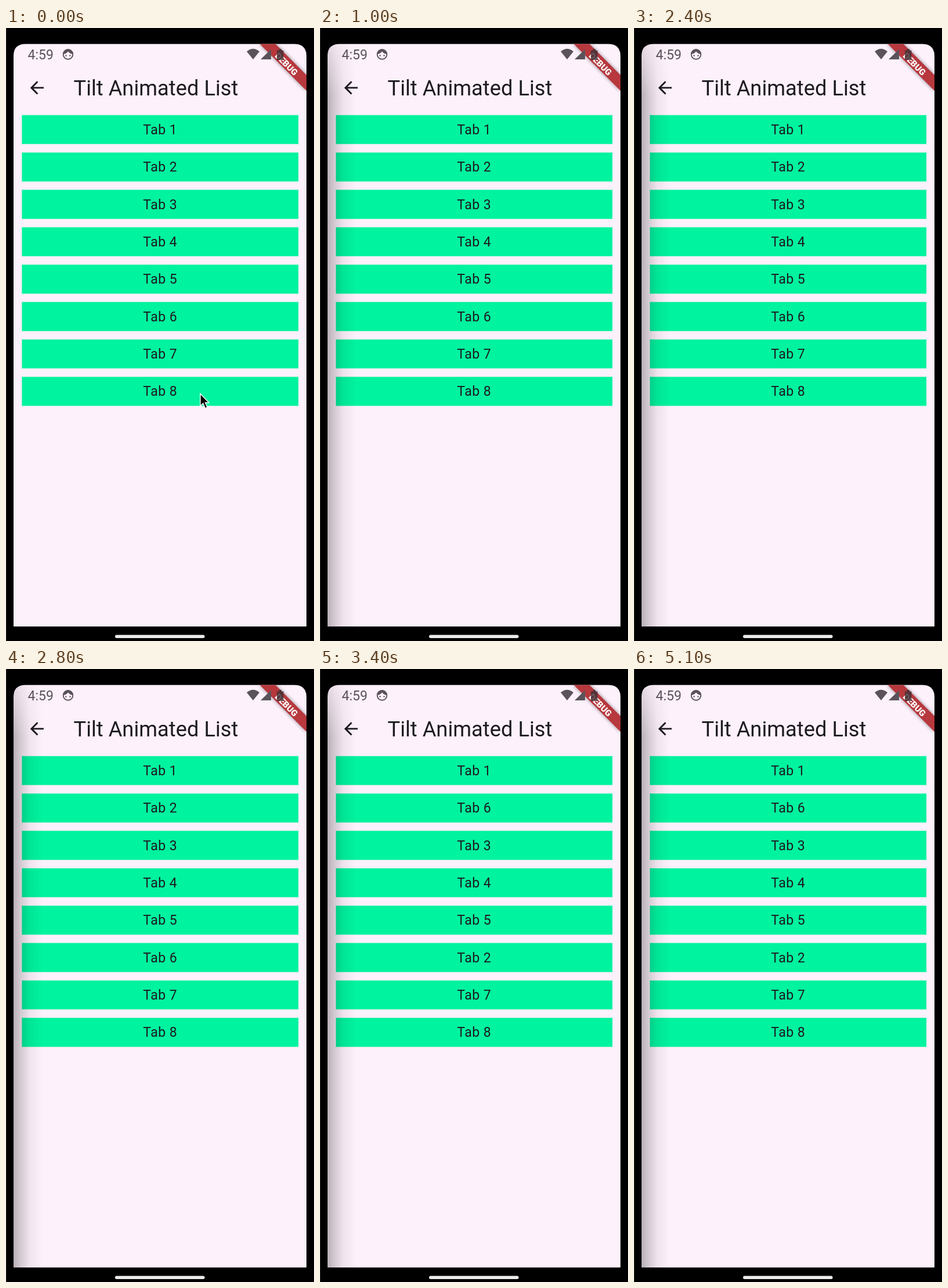
An HTML page for the animation above (5200 ms loop, 531 px wide and 1055 px high).

```html
<!DOCTYPE html>
<html lang="en">
<head>
<meta charset="utf-8">
<title>Tilt Animated List</title>
<style>
  html, body { margin: 0; width: 100%; height: 100%; overflow: hidden; background: #000; }
  svg { display: block; width: 531px; height: 1055px; font-family: Roboto, sans-serif; }
  .tab rect { fill: #00f39f; stroke: #5cf0b8; stroke-width: .6; }
  .tab text { font-size: 23.1px; letter-spacing: .4px; text-anchor: middle; }
</style>
</head>
<body>
<svg viewBox="0 0 531 1055" fill="#1d1b20">
  <defs>
    <clipPath id="screen"><path d="M13 1030V48Q13 27.500 34 27.500H497Q518 27.500 518 48V1030Z"/></clipPath>
    <linearGradient id="dark">
      <stop offset="0" stop-opacity=".27"/>
      <stop offset=".25" stop-opacity=".16"/>
      <stop offset=".55" stop-opacity=".055"/>
      <stop offset="1" stop-opacity="0"/>
    </linearGradient>
    <linearGradient id="fade" x2="0" y2="1">
      <stop offset="0" stop-color="#555"/>
      <stop offset=".09" stop-color="#fff"/>
    </linearGradient>
    <mask id="top"><rect x="13" y="27" width="60" height="1003" fill="url(#fade)"/></mask>
    <filter id="soft"><feGaussianBlur stdDeviation="3"/></filter>
  </defs>
  <rect width="531" height="1055" fill="#000"/>
  <rect width="1" height="1055" fill="#242424"/>
  <g clip-path="url(#screen)">
    <rect x="13" y="27" width="505" height="1003" fill="#fdf1fb"/>
    <path transform="translate(36 85.500) scale(1.45)" d="M20 11H7.830l5.590-5.590L12 4l-8 8 8 8 1.410-1.410L7.830 13H20z"/>
    <text x="116.500" y="115.500" font-size="36.300">Tilt Animated List</text>
    <g id="tabs"></g>

    <path d="M437 27L518 108V81L464 27Z" opacity=".5" filter="url(#soft)"/>
    <path d="M437 27L518 108V81L464 27Z" fill="#b7383d"/>
    <text transform="translate(483.500 62) rotate(45)" y="5.300" font-size="15" font-weight="900" text-anchor="middle" fill="#fff">DEBUG</text>

    <g fill="#5a535a">
      <text x="37.500" y="54" font-size="23">4:59</text>
      <circle cx="107" cy="45.500" r="8.300" fill="none" stroke="#5a535a" stroke-width="1.900"/>
      <path d="M98 45A9 9 0 0 1 116 45Q111 45 107 40.500Q103 45 98 45Z"/>
      <circle cx="103.500" cy="47.500" r="1.200"/>
      <circle cx="110.500" cy="47.500" r="1.200"/>
      <path d="M415 40.500Q426 31 437 40.500L426 54Z"/>
      <path d="M439 54L457 36.500V54Z"/>
      <path d="M467 38.500h3.500v-2.500h4.500v2.500h3.500v16.500h-11.500Z" fill="#3f3035" opacity=".8"/>
    </g>
    <rect id="shade" x="13" y="27" width="50" height="1003" fill="url(#dark)" mask="url(#top)"/>
  </g>
  <rect x="188" y="1044.500" width="154.500" height="5.500" rx="2.750" fill="#ececec"/>
  <path id="cursor" d="M0 0V21L4.800 16.500L8.300 25L12 23.300L8.500 15.200H14.800Z" fill="#000" stroke="#fff" stroke-width="1.400"/>
</svg>
<script>
const LOOP = 5200, PITCH = 64.35;
const $ = id => document.getElementById(id);

// [time, slot] stops per tab; the rest stay at home
const moves = {
  2: [[2820, 2], [3000, 4.33], [3130, 6]],
  5: [[2820, 5], [3000, 3.245], [3020, 3.245], [3320, 5]],
  6: [[3020, 6], [3320, 2]]
};
const pointer = {
  x: [[200, 335], [850, -20]],
  y: [[200, 629.5], [850, 600]]
};

function at(stops, t) {
  if (t <= stops[0][0]) return stops[0][1];
  for (let i = 1; i < stops.length; i++) {
    const [t0, a] = stops[i - 1], [t1, b] = stops[i];
    if (t < t1) return a + (b - a) * (t - t0) / (t1 - t0);
  }
  return stops[stops.length - 1][1];
}

$('tabs').innerHTML = Array.from({ length: 8 }, (_, i) =>
  `<g class="tab"><rect x="27.5" y="150" width="476.5" height="49.7"/>
   <text x="265.7" y="183">Tab ${i + 1}</text></g>`).join('');
const tabs = [...$('tabs').children];

function draw(now) {
  const t = now % LOOP;
  tabs.forEach((tab, i) => {
    const slot = at(moves[i + 1] || [[0, i + 1]], t);
    tab.setAttribute('transform', `translate(0 ${(slot - 1) * PITCH})`);
  });
  $('cursor').setAttribute('transform', `translate(${at(pointer.x, t)} ${at(pointer.y, t)})`);
  $('cursor').style.display = t < 850 ? '' : 'none';
  $('shade').style.display = t < 900 ? 'none' : '';
  requestAnimationFrame(draw);
}
draw(performance.now());
</script>
</body>
</html>
```
